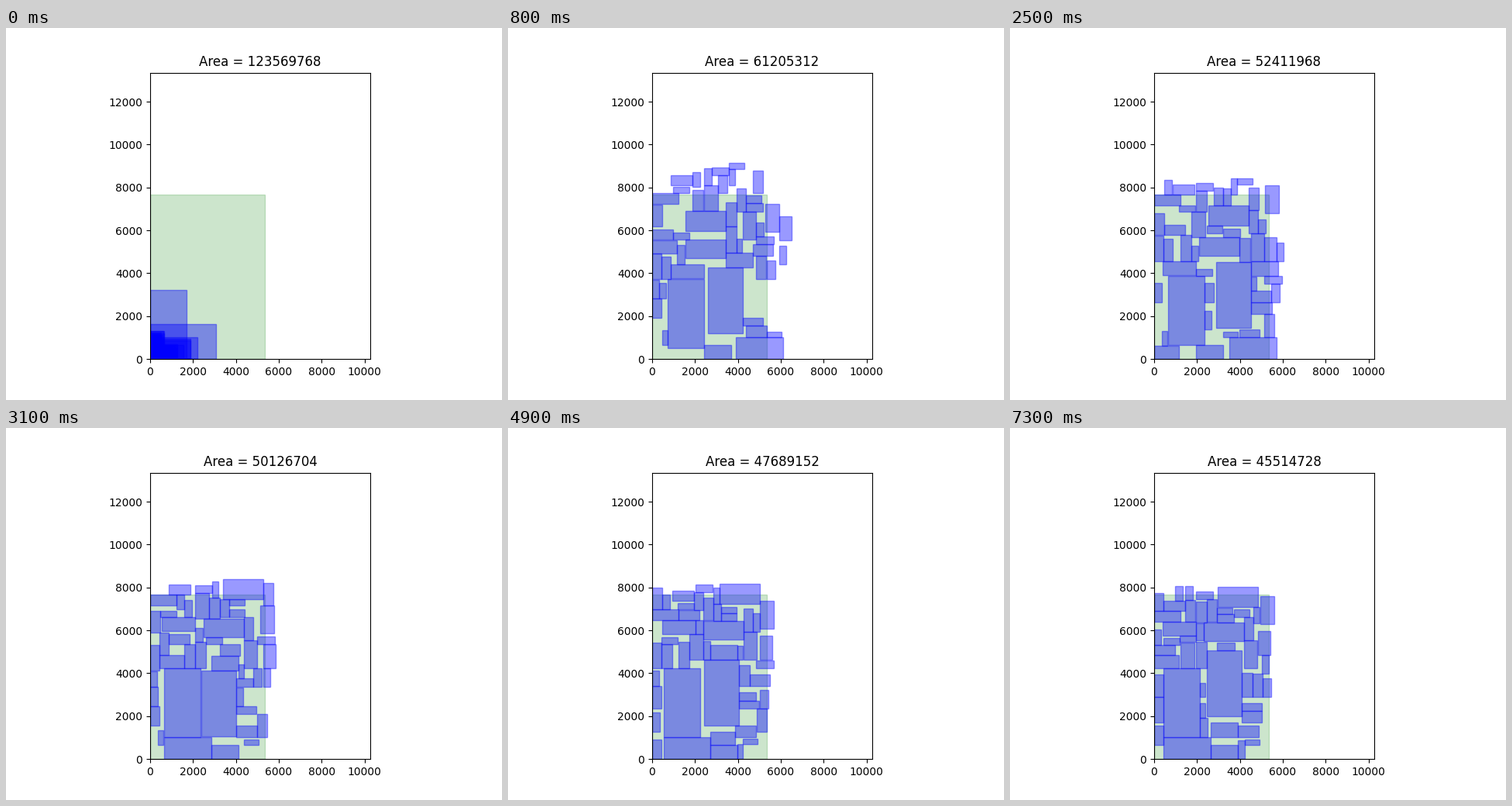
These frames come from a looping animation (640 by 480 pixels, 8000 ms). A matplotlib script:

```python
import numpy as np
import matplotlib.pyplot as plt
from matplotlib.animation import FuncAnimation
from matplotlib.patches import Rectangle

UNIT = 36.13          # floorplan grid, in axis units
EPS = 0.01
STEP_MS, LOOP_MS = 100, 8000

# Moments at which the search finds a smaller floorplan.
STEPS = np.r_[0:1400:100, 2000, 2200, 2500, 2600, 2800:3200:100, 3300, 3500,
              3700, 3800, 4100, 4400, 4600:5000:100, 5700:6000:100, 6600,
              7100:7400:100]

# Area milestones of the search, and the box width as it advances past them.
MILESTONES = [0, 800, 2500, 3800, 4900, 6600, 7300]
AREAS = [123569768, 61205312, 52411968, 48370448, 47689152, 46826164, 45514728]
MILESTONE_STEPS = np.searchsorted(STEPS, MILESTONES)
WIDTH_STAGES, WIDTHS = [0, 1, 2, 3, 6], [262, 180, 167, 160, 155]

# Large blocks, in the order tower, hall, base, lid, beam, shelf, slab.
LARGE = np.array([(47.3, 89), (45, 85), (60.6, 28), (52, 26), (52, 24),
                  (43, 18), (18, 36)])
HALL = 1

# Their places at the start and end of the two arrangements.
EARLY = np.array([
    [(20, 14), (72, 33), (108, 0), (43, 165), (43, 130), (24, 104), (146, 164)],
    [(18, 18), (80, 40), (97, 0), (70, 172), (58, 133), (11, 108), (143, 188)]])
LATE = np.array([
    [(18, 28), (66, 29), (18, 0), (94, 206), (69, 157), (15, 165), (142, 162)],
    [(12, 28), (68, 55), (12, 0), (82, 196), (64, 152), (11, 159), (137, 174)]])

# Small blocks shrink evenly; most stand upright.
SMALL_COUNT = 42
rng = np.random.default_rng(7)
long_side = np.round(np.geomspace(36, 18, SMALL_COUNT))
short_side = np.round(long_side * rng.uniform(0.36, 0.56, SMALL_COUNT))
upright = rng.random(SMALL_COUNT) < 0.6
SMALL = np.column_stack([np.where(upright, short_side, long_side),
                         np.where(upright, long_side, short_side)])
HOMES = rng.random((SMALL_COUNT, 2))


def free_corner(size, home, box, placed):
    """Find the free spot for a block that lies nearest its home."""
    room = box - size
    rects = np.array(placed)
    low, high = rects[:, :2], rects[:, :2] + rects[:, 2:]
    axes = [np.unique(np.r_[0, room[k], high[:, k]]) for k in (0, 1)]
    axes = [a[a <= room[k] + EPS] for k, a in enumerate(axes)]
    spots = np.stack(np.meshgrid(*axes), axis=-1).reshape(-1, 2)
    hits = np.ones((len(spots), len(rects)), bool)
    for k in (0, 1):
        start = spots[:, k, None]
        hits &= (start < high[:, k] - EPS) & (start + size[k] > low[:, k] + EPS)
    spots = spots[~hits.any(axis=1)]
    if len(spots) == 0:
        return None
    return spots[np.argmin(np.hypot(*(spots - home * room).T))]


def large_places(stage, width):
    if stage < 2.5:
        start, end = EARLY
        ease = np.clip(stage - 1, 0, 1)
    else:
        start, end = LATE
        ease = 1 - (1 - np.clip((stage - 3) / 3, 0, 1)) ** 2
    spread = max(1, width / WIDTHS[1])
    return (start + (end - start) * ease) * spread


def pile():
    """All blocks at the origin, the hall on its side."""
    sizes = np.vstack([LARGE, SMALL])
    sizes[HALL] = sizes[HALL, ::-1]
    return [(0, 0, w, h) for w, h in sizes]


def floorplan(step):
    """Return the blocks and the area after one step of the search."""
    stage = np.interp(step, MILESTONE_STEPS, range(len(AREAS)))
    area = np.exp(np.interp(step, MILESTONE_STEPS, np.log(AREAS)))
    area = 4 * int(round(area / 4))
    if step == 0:
        return pile(), area
    width = np.interp(stage, WIDTH_STAGES, WIDTHS)
    box = np.array([width, area / UNIT**2 / width])
    placed = [(*p, *s) for p, s in zip(large_places(stage, width), LARGE)]
    for size, home in zip(SMALL, HOMES):
        for turned in (size, size[::-1]):
            spot = free_corner(turned, home, box, placed)
            if spot is not None:
                placed.append((*spot, *turned))
                break
    return placed, area


PLANS = [floorplan(step) for step in range(len(STEPS))]

fig, ax = plt.subplots(figsize=(6.4, 4.8), dpi=100)
ax.set(xlim=(0, 10262), ylim=(0, 13352), aspect="equal")
ax.add_patch(Rectangle((0, 0), 5350, 7655, color="green", alpha=0.2))
blocks = [ax.add_patch(Rectangle((0, 0), 1, 1, color="blue", alpha=0.4))
          for _ in range(len(LARGE) + SMALL_COUNT)]
title = ax.set_title("")


def draw(frame):
    step = np.searchsorted(STEPS, frame * STEP_MS, side="right") - 1
    layout, area = PLANS[step]
    for i, block in enumerate(blocks):
        block.set_visible(i < len(layout))
        if i < len(layout):
            block.set_bounds(*np.multiply(layout[i], UNIT))
    title.set_text(f"Area = {area}")
    return [*blocks, title]


anim = FuncAnimation(fig, draw, frames=LOOP_MS // STEP_MS, interval=STEP_MS,
                     repeat=True, repeat_delay=0)
plt.show()
```
